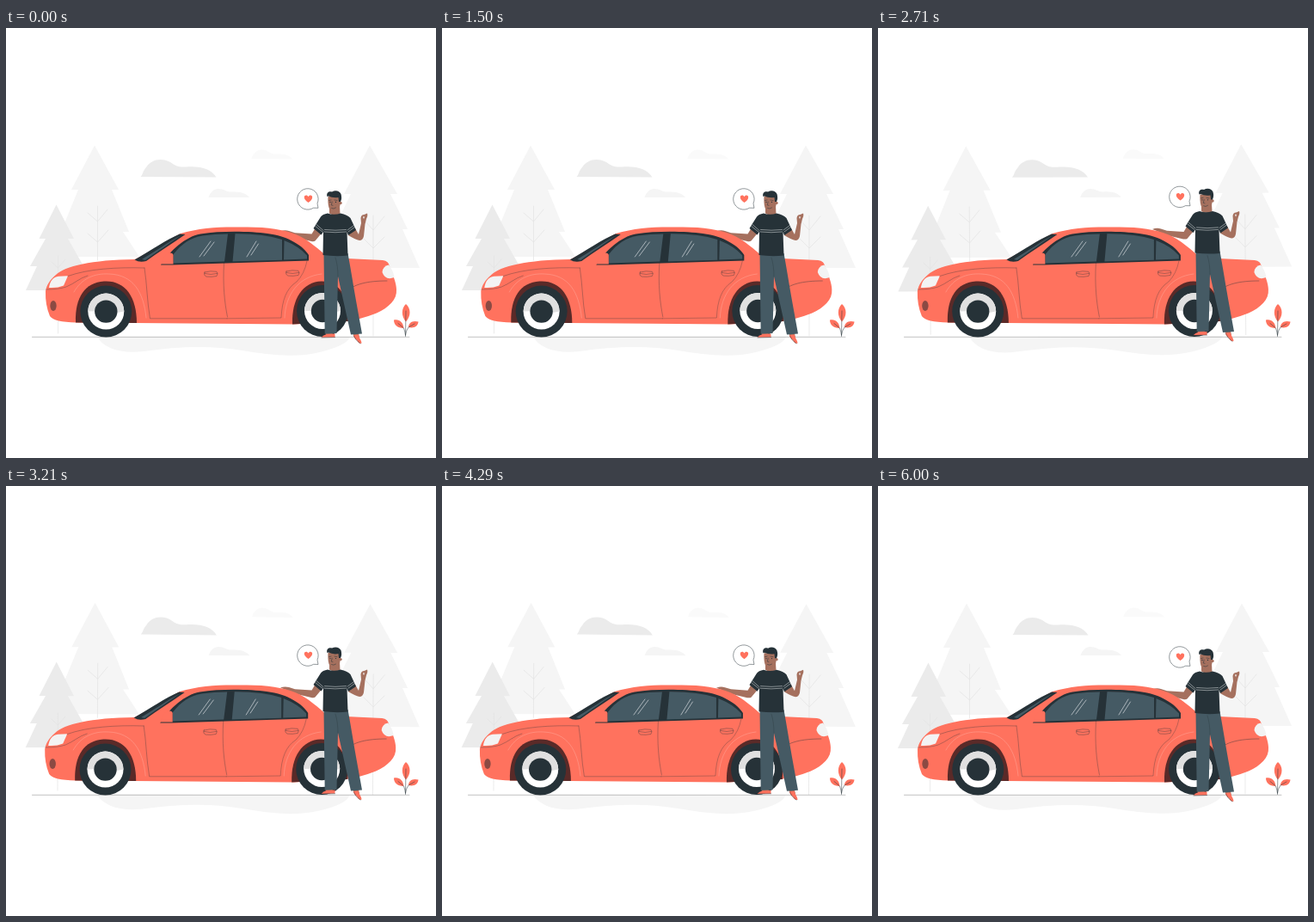
Write an HTML page that moves like this. It is 500 px wide and 500 px high and loops after 6.04 s.

```html
<!DOCTYPE html>
<html lang="en">
<head>
<meta charset="utf-8">
<title>Car and driver</title>
<style>
html, body { margin: 0; width: 100%; height: 100%; overflow: hidden; background: #fff }
svg { display: block; width: 100vw; height: 100vh }
.line { fill: none; stroke-linecap: round; stroke-linejoin: round }
.ink { stroke: #263238; stroke-width: .5 }
.coral { fill: #ff725e }
.dark { fill: #263238 }
.slate { fill: #455a64 }
.skin { fill: #a5705e }
.arch { fill: #5a2a28 }
</style>
</head>
<body>
<svg viewBox="0 0 500 500">
  <defs>
    <g id="wheel">
      <circle r="30" class="dark"/>
      <circle r="21" fill="#fff"/>
      <path d="M-21 0A21 21 0 0 1 21 0Q10 3 0 1T-21 0Z" fill="#e0e0e0"/>
      <circle r="13.200" class="dark"/>
    </g>
    <path id="handle" d="M1 1.5Q8-.6 15 .8Q17 3 15 6Q9 7.3 3 6.6Q-.6 5 1 1.5ZM1 3Q8 5 15.6 3"/>
  </defs>

  <g id="scenery">
    <path fill="#f5f5f5" d="M106 359C114 373 134 379 160 376C200 370 240 369 275 375C305 380 335 384 365 377C385 372 398 366 400 359Z"/>
    <g fill="#f5f5f5">
      <path d="M103 136.5L131 188H123L143 237H136L155 266H51L71 237H64L84 188H76Z"/>
      <path d="M423 136.5L455 193H447L467 234H461L481 279H368L388 234H381L401 193H393Z"/>
      <path d="M235.500 197C237 192 241 187 247 187C254 187 256 191 263 190.500C274 190 280 193 283 197Z"/>
      <path d="M285.500 152C287 146 292 141.500 297 141.500C304 141 306 146.500 313 146.500C323 146 331 148 333 152.500Z" fill="#fafafa"/>
    </g>
    <g fill="#ebebeb">
      <path d="M58.500 205.500L79 245H72L90 276.500H83L100 305H23L36 277H28L46 245H38.500Z"/>
      <path d="M156.500 173C160 169 158 168 163 162C168 153 181 150 191 156C197 160 200 162 209 161.500C226 160 239 164 244.500 173.500Z"/>
    </g>
    <g class="line" stroke="#e2e2e2" stroke-width=".7">
      <path d="M106.500 207V270M95 215L106.500 225L118 211M95 239L106.500 249L119 235"/>
      <path d="M427 218V358M417 224L427 235L440 219M416 245L427 256L440 243"/>
      <path d="M60.500 265V355M53 272L60.500 279L69 269"/>
    </g>
  </g>

  <path class="line" stroke="#999" stroke-width=".6" d="M30.500 359.300H469"/>

  <g class="person">
    <path class="skin" d="M319 236.500Q324 234.500 329 236L336 238.200L355.500 239.500L360 232L367 238.500L359.500 247.500Q358 248.500 355 248L334 243Q328 242 325.500 239Z"/>
  </g>

  <g id="car">
    <path class="coral" d="M46 306C47 299 51 293 58 287C68 277 100 269.500 150 269C170 259 187 247 203 239C225 232 250 231 275 231.500C302 231 322 234 337 240C352 246 364 258 375 267L438 270Q445 271 446 277C450 287 454 297 454 304C455 316 445 325 431 331.500Q412 339 395 341L335 344.500L150 343L82 342.500C64 342 55 340 51 335Q45.500 322 46 306Z"/>
    <path class="arch" d="M81 342.500C80 313 92 296 114 294.500C138 293 152 312 152 343Z"/>
    <path class="arch" d="M333 344.500C332 315 345 295 367 294.500C388 295 399 313 398 341Z"/>
    <use href="#wheel" x="116.300" y="329.600"/>
    <use href="#wheel" x="368" y="329"/>

    <path class="dark" d="M149.500 269.500C169 258 187 246 202 239.500L208.500 240C194 250 177 261 163 271Q155 273 149.500 269.500Z"/>
    <path class="slate" d="M158 269C173 260 189 249 203 241C191 250 176 260 162 270Z"/>
    <path class="dark" d="M180 275.500C192 258 208 243 226 239.500C251 235.500 285 236.500 304 239C329 242 346 254 352 264V270.500Q272 273 193 275.500Z"/>
    <g class="slate">
      <path d="M194.500 273.500L194.800 263C204 251 215 243.500 229 241.500Q243 239.500 258 239.500L254 271.500Z"/>
      <path d="M266.500 239.200Q300 239 321 246V269.700L263.500 271.500Z"/>
      <path d="M323.500 247Q341 254 350 264.500V268.500L323 269.500Z"/>
    </g>
    <path class="line" stroke="#eceff1" stroke-width=".6" d="M225 266L238 248M230 265L242 249M280 266L291 248M285 264L293.500 251"/>
    <path class="coral" d="M180.500 274.500C182 267 186 262.500 190 261.500Q194 261 194.500 264V274.500Z"/>

    <path fill="#f3f3f3" d="M50 302C51 294 55 289.500 61 288.700L72 288.200L67 299.500Q60 302.500 50 302Z"/>
    <path fill="#f3f3f3" d="M437.500 284Q438 277 445 275.500Q450 281 451.500 290Q441 294 437.500 284Z"/>
    <ellipse cx="55" cy="323" rx="3.700" ry="6" fill="#8b4a43"/>

    <g class="line ink">
      <path d="M72 288.500C96 280 128 278 161 279M47 304Q61 304 70 301C80 297 85 291 95 288" opacity=".65"/>
      <path d="M161 279C164 298 164 318 167.500 337.800H257M253.500 273C252 299 254 318 257.500 336" opacity=".65"/>
      <path d="M257 337.800L320 337C321 316 326 303 338 295Q347 286 350 271" opacity=".6"/>
      <path d="M397 306C404 298 420 294 443 294" opacity=".8"/>
      <g opacity=".75">
        <use href="#handle" x="230" y="282.500"/>
        <use href="#handle" x="325" y="281.500"/>
      </g>
    </g>
    <path class="line" stroke="#ffb3a7" stroke-width=".6" opacity=".7" d="M79 307C88 291 103 285 120 286C148 287 160 307 163 337M324 337C325 310 340 289 367 286"/>
  </g>

  <g class="person">
    <path class="skin" fill-rule="evenodd" d="M398 237L406 233L410 240L413 227L412.500 221Q413 217 416.500 217L420 215.500Q421 218 419 222L417.500 228L416 242Q415 247 411 247Q406 246 398 241ZM416 218.500Q414.300 220 416 222Q417.700 220 416 218.500Z"/>

    <path class="skin" d="M371.500 354H380L379.500 358H372ZM403 355H410L411 360L405 359Z"/>
    <path class="coral" d="M366.500 359.800Q369 357 373 356L382.500 355.500V359.500Z"/>
    <path class="coral" d="M404 357L410 356.500C410 360 413.500 363 413.500 366.500Q411 368 408 363Q404 360 404 357Z"/>
    <path class="line ink" d="M367 360L382.500 359.600M404.500 358Q406 363 412 367"/>
    <path class="slate" d="M369.500 262H397.500C401 281 404 300 407 317L414 355.500L401 356.500L386 289L384.500 355L370.700 355.500Z"/>
    <path class="line ink" d="M383 267Q386 276 386 289" opacity=".6"/>

    <path class="skin" d="M376 208L388 207L388.500 216Q381 219 376 215.500Z"/>
    <path class="skin" d="M374.500 196L388.500 196C389.500 206 388 214.500 381.500 214.500C375 214 374 205 374.500 196Z"/>
    <circle class="skin" cx="389" cy="203.500" r="1.700"/>
    <path class="dark" d="M373.500 196C372 191 376 189.500 379 190.500C383 188 388 189.500 389.500 193Q391 198 389 202L387 202L386.500 197Q380 198 375 195.500Z"/>
    <path class="line ink" d="M375.500 200.500L378 200M382 200L385 200.500M379.200 202L378.300 206L380 206.400M378.500 209.500Q381 211 383.500 209"/>
    <circle class="dark" cx="377" cy="202.400" r=".6"/>
    <circle class="dark" cx="383.500" cy="202.400" r=".6"/>

    <path class="dark" d="M374 215.500Q381 218 389 215.500Q397 217 400.500 221L407 235L398 241L396.500 237L397.500 264.500Q383 266 368.500 264L369 237L366.500 240.500L357.500 233L366 219.500Q368 216.500 374 215.500Z"/>
    <path class="line" stroke="#e5e8e9" stroke-width=".5" d="M361 228.500L369 235.500M359.700 230.500L368 237M398 237L405.500 231.500M397 235L404.500 229.500M370.500 234.500Q383 236 395.500 234.500M370 237Q383 238.500 395.500 237"/>

    <path fill="#fff" class="ink" d="M357.500 209.200A12.200 12.200 0 1 1 362 204L363 209.300Z"/>
    <path class="coral" d="M351.500 203C348 200.500 346.500 198.500 346.800 196.500C347.200 194 350.400 193.800 351.500 196.300C352.700 193.800 356 194.100 356.200 196.700C356.300 199 354 201.300 351.500 203Z"/>
  </g>

  <path class="coral" d="M465 341.500C459.500 335 459.500 326 465 321C471 326 471 335 465 341.500ZM462.500 349C455 349 451 345 451 339.500C457 338 462 342 462.500 349ZM468 348C468 342.500 473 339.500 479.500 341.500C479 347 474 349.500 468 348Z"/>
  <path class="line ink" d="M465 329L464.500 358.500M456 343.500L462.500 349Q464 353 464.500 357M475 344L468 348Q465 352 464.500 357"/>
</svg>
<script>
const LOOP = 6040, UNIT = 2 / 3;
const SHAKE = [0, -1, 2, -4, 4, -4, 4, -4, 2, -1, 0];
const scenery = document.getElementById('scenery');
const car = document.getElementById('car');
const people = document.querySelectorAll('.person');

// Linear interpolation through evenly spaced keys, p in 0..1
function track(keys, p) {
  const x = p * (keys.length - 1), i = Math.floor(x), next = keys[i + 1] ?? keys[i];
  return keys[i] + (next - keys[i]) * (x - i);
}

const cycle = (t, period) => t % period / period;

function draw() {
  const t = performance.now() % LOOP;
  const angle = track([0, 1, 0, -1, 0], cycle(t, 3000));
  const shift = UNIT * track(SHAKE, cycle(t, 6000));
  const lift = UNIT * track([0, -10, 0], cycle(t, 1500));
  scenery.setAttribute('transform', `rotate(${angle} 250 250)`);
  car.setAttribute('transform', `translate(${shift})`);
  for (const part of people) part.setAttribute('transform', `translate(0 ${lift})`);
  requestAnimationFrame(draw);
}
draw();
</script>
</body>
</html>
```
